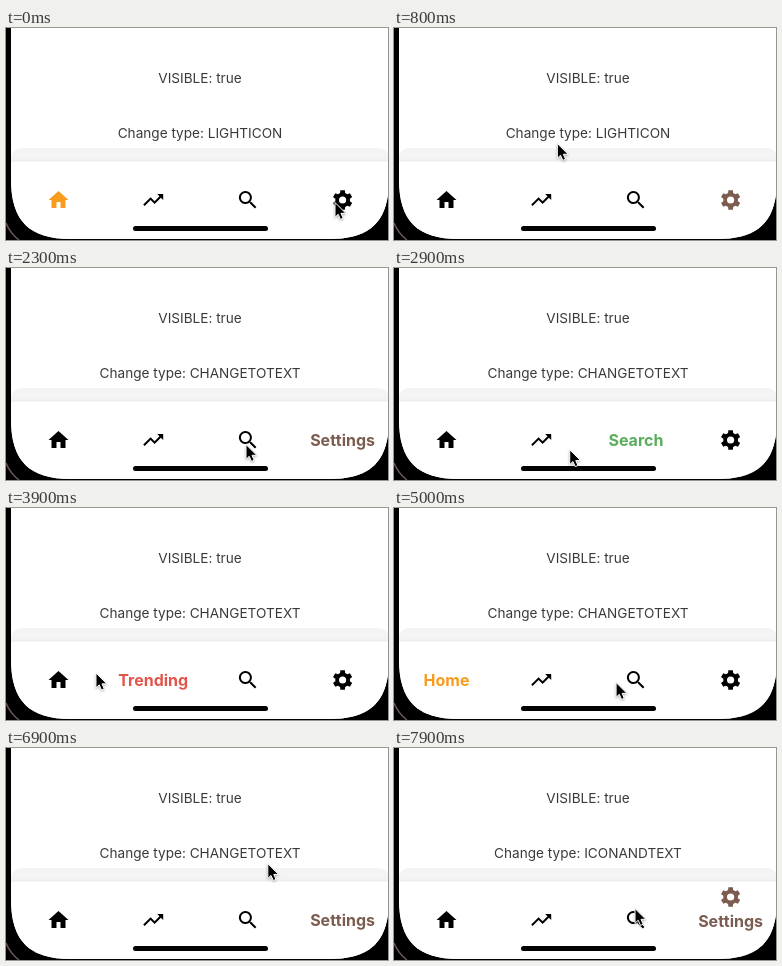
An HTML page for the animation above (8 s loop, 382 px wide and 212 px high).

```html
<!DOCTYPE html>
<html lang="en">
<head>
<meta charset="utf-8">
<title>Bottom navigation</title>
<style>
  html, body { margin: 0; width: 100%; height: 100%; overflow: hidden; background: #000; }
  svg { display: block; width: 382px; height: 212px; }
  text { font-family: Inter, Roboto, sans-serif; text-anchor: middle; }
  .info { font-size: 13.6px; fill: #3a3a3a; }
  .label { font-size: 16px; font-weight: 700; }
  #cursor { filter: drop-shadow(0 1px 1px rgba(0, 0, 0, .3)); }
</style>
</head>
<body>
<svg viewBox="0 0 382 212">
  <defs>
    <linearGradient id="shade" x2="0" y2="1">
      <stop offset="0" stop-color="#f5f5f5"/>
      <stop offset=".6" stop-color="#f3f3f3"/>
      <stop offset="1" stop-color="#ebebeb"/>
    </linearGradient>
    <clipPath id="screen">
      <path d="M5 0V151C5 193 23 211 65 211H323C365 211 383 193 383 151V0Z"/>
    </clipPath>
  </defs>
  <rect width="382" height="212"/>
  <path d="M0 195Q4 205 13 212" fill="none" stroke="#6a555c" stroke-width="1.5"/>
  <g clip-path="url(#screen)">
    <rect width="382" height="212" fill="#fff"/>
    <rect x="5" y="120" width="378" height="24" rx="10" fill="#f4f4f4"/>
    <rect x="5" y="126" width="378" height="8" fill="url(#shade)"/>
    <rect x="5" y="133.5" width="378" height="78" fill="#fff"/>
    <text class="info" x="194" y="55">VISIBLE: true</text>
    <text class="info" id="type" x="194" y="110"></text>
    <g id="tabs"></g>
    <rect x="127" y="198" width="135" height="5" rx="2.5"/>
  </g>
  <path id="cursor" d="M0 .5V15.3L3.2 12.3 5.5 17.4 8.2 16.2 6 11.3H10.8Z" stroke="#fff"/>
</svg>
<script>
const LOOP = 8000, STEP = 100;
const HOME = 0, TREND = 1, SEARCH = 2, GEAR = 3;

const tabs = [
  { name: 'Home', color: '#f99b1c', icon: 'M10 20v-6h4v6h5v-8h3L12 3 2 12h3v8z' },
  { name: 'Trending', color: '#e2554b', icon: 'M16 6l2.29 2.29-4.88 4.88-4-4L2 16.59 3.41 18l6-6 4 4 6.3-6.29L22 12V6z' },
  { name: 'Search', color: '#58ae5b', icon: 'M15.5 14h-.79l-.28-.27A6.5 6.5 0 1 0 13.73 14.43l.27.28v.79l5 4.99L20.49 19zM9.5 14a4.5 4.5 0 1 1 0-9 4.5 4.5 0 0 1 0 9z' },
  { name: 'Settings', color: '#7a5c50', icon: gearPath() }
];
const tabX = i => 52.5 + 94.7 * i;

// Six teeth around a ring with a round hole.
function gearPath() {
  let d = '';
  for (let i = 0; i < 24; i++) {
    const outer = i % 4 === 1 || i % 4 === 2;
    const side = i % 4 < 2 ? -1 : 1;
    const a = (Math.floor(i / 4) * 60 + 30 + side * (outer ? 13 : 20)) * Math.PI / 180;
    const r = outer ? 10 : 7.4;
    d += (i ? 'L' : 'M') + (12 + r * Math.cos(a)).toFixed(2) + ' ' + (12 + r * Math.sin(a)).toFixed(2);
  }
  return d + 'ZM12 8.4a3.6 3.6 0 1 0 0 7.2 3.6 3.6 0 0 0 0-7.2z';
}

const moves = [], changes = [];
let pos = { x: 329, y: 174 };

function move(start, end, x, y, via) {
  const to = { x, y };
  via = via || { x: (pos.x + x) / 2, y: (pos.y + y) / 2 };
  moves.push({ start, end, from: pos, via, to });
  pos = to;
}
const change = (time, selected, type) => changes.push({ time, selected, type });

change(0, HOME, 'LIGHTICON');
change(200, GEAR, 'LIGHTICON');
move(500, 1000, 205, 103, { x: 80, y: 110 });
change(1300, GEAR, 'CHANGETOTEXT');
move(1400, 2300, 240, 176, { x: 280, y: 145 });
change(2400, SEARCH, 'CHANGETOTEXT');
move(2300, 3200, 160, 173, { x: 187, y: 194 });
change(3400, TREND, 'CHANGETOTEXT');
move(3300, 4300, 53, 167, { x: 105, y: 160 });
change(4500, HOME, 'CHANGETOTEXT');
move(4500, 5200, 230, 174, { x: 227, y: 175 });
change(5400, SEARCH, 'CHANGETOTEXT');
move(5400, 6100, 331, 170);
change(6300, GEAR, 'CHANGETOTEXT');
move(6300, 7100, 249, 105);
change(7200, GEAR, 'ICONANDTEXT');
move(7600, 7900, 241, 160);

const byId = id => document.getElementById(id);

byId('tabs').innerHTML = tabs.map((t, i) =>
  `<g><path d="${t.icon}" fill-rule="evenodd"/><text class="label" x="${tabX(i)}">${t.name}</text></g>`).join('');
const groups = [...byId('tabs').children];

// Each move eases along a quadratic curve.
function pointer(t) {
  const m = moves.filter(m => m.start <= t).pop() || moves[0];
  const k = Math.min(1, Math.max(0, (t - m.start) / (m.end - m.start)));
  const s = k * k * (3 - 2 * k), r = 1 - s;
  const along = axis => r * r * m.from[axis] + 2 * r * s * m.via[axis] + s * s * m.to[axis];
  return [along('x'), along('y')];
}

function draw(t) {
  const { selected, type } = changes.filter(c => c.time <= t).pop();
  byId('type').textContent = 'Change type: ' + type;
  tabs.forEach((tab, i) => {
    const on = i === selected;
    const both = on && type === 'ICONANDTEXT';
    const textOnly = on && type === 'CHANGETOTEXT';
    const [icon, label] = groups[i].children;
    groups[i].setAttribute('fill', on ? tab.color : '#000');
    icon.setAttribute('transform', `translate(${tabX(i) - 12} ${both ? 137 : 160})`);
    icon.style.display = textOnly ? 'none' : '';
    label.setAttribute('y', both ? 179 : 178);
    label.style.display = textOnly || both ? '' : 'none';
  });
  byId('cursor').setAttribute('transform', `translate(${pointer(t).join(' ')})`);
}

const start = performance.now();
function tick() {
  const t = (performance.now() - start) % LOOP;
  draw(Math.floor(t / STEP) * STEP);
  requestAnimationFrame(tick);
}
tick();
</script>
</body>
</html>
```
